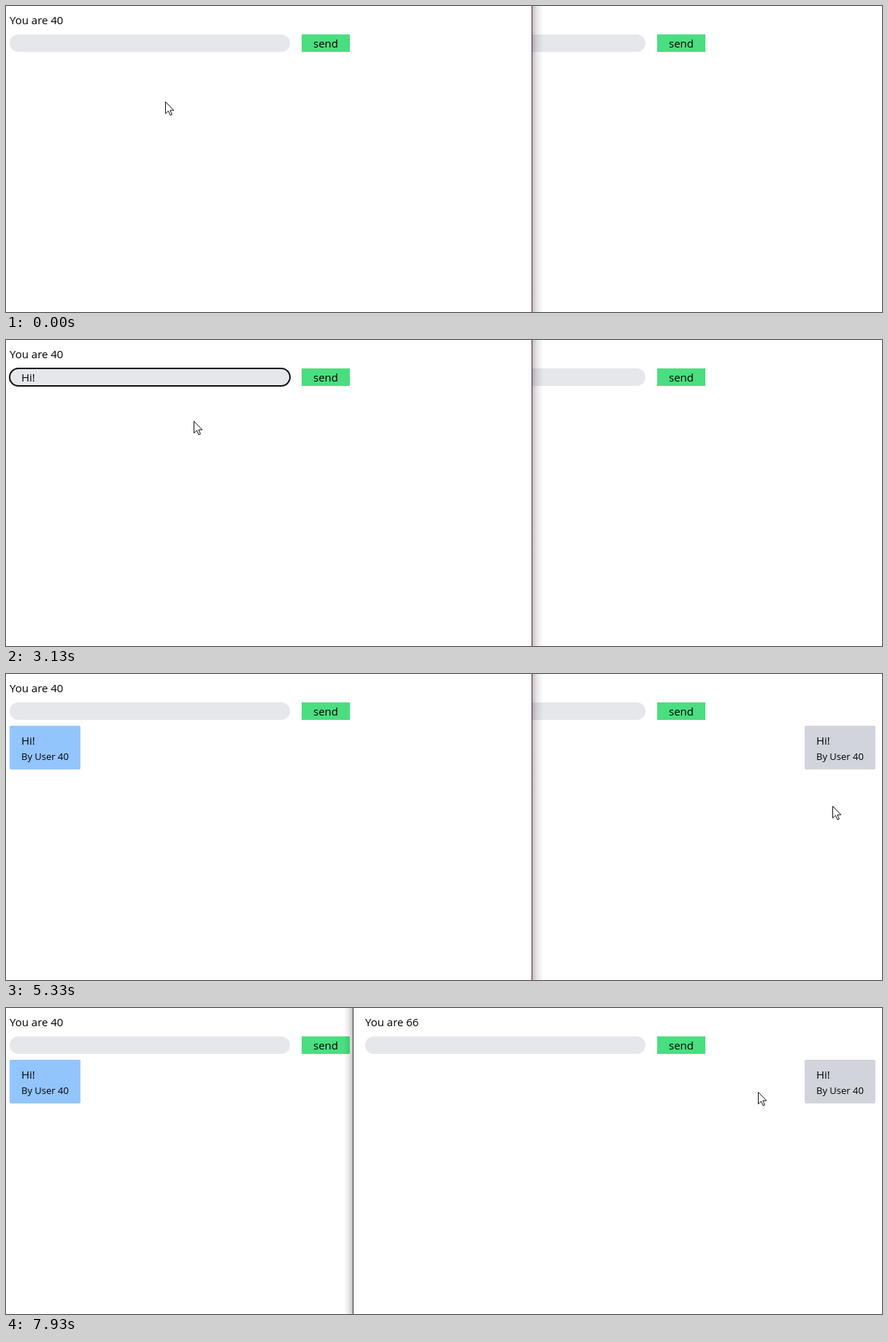
Write an HTML page that moves like this. It is 1200 px wide and 420 px high and loops after 8 s.

```html
<!DOCTYPE html>
<html lang="en">
<head>
<meta charset="utf-8">
<title>Two chat windows</title>
<style>
  html, body { margin: 0; width: 100%; height: 100%; overflow: hidden; background: #fff; }
  svg { display: block; width: 1200px; height: 420px; }
  text { font: 15px "Open Sans", "Noto Sans", sans-serif; fill: #000; }
  .small { font-size: 13px; }
  #cursor path { fill: #fff; stroke: #111; stroke-width: 1; stroke-linejoin: round; }
  #cursor .line { fill: none; }
</style>
</head>
<body>
<svg viewBox="0 0 1200 420">
  <defs>
    <linearGradient id="fade">
      <stop offset="0" stop-opacity=".25"/>
      <stop offset=".4" stop-opacity=".1"/>
      <stop offset="1" stop-opacity="0"/>
    </linearGradient>
  </defs>
  <g id="panes"></g>
  <g id="cursor">
    <g id="arrow"><path d="M.5 .5V16.8L4.4 13.1L7 19L9.4 18L6.9 12.2H11.8Z"/></g>
    <g id="hand">
      <path d="M-1 13V2Q-1 .5 .7 .5T2.5 2V8.5Q2.5 7 4.2 7T6 9Q6 7.8 7.6 7.8T9 10Q9.2 9 10.4 9T11.5 11V16Q11.5 19 9.5 21V23.5H1V21.5L-4.5 14.5Q-5 12.5 -3.5 12T-1 14Z"/>
      <path class="line" d="M2.5 8V13M6 9V13M9 10V13"/>
    </g>
    <g id="beam"><path class="line" d="M-3 -5.5H0M1 -5.5H4M-3 7.5H0M1 7.5H4M.5 -5V7"/></g>
  </g>
</svg>
<script>
const LOOP = 8000, FPS = 15, TICKS = LOOP * FPS / 1000;
const $ = id => document.getElementById(id);

const rect = (x, y, w, h, fill, rx = 0) =>
  `<rect x="${x}" y="${y}" width="${w}" height="${h}" fill="${fill}" rx="${rx}"/>`;
const label = (x, y, str, cls = "") => `<text x="${x}" y="${y}" class="${cls}">${str}</text>`;

const form = (x, user) =>
  label(x, 25, "You are " + user) +
  rect(x, 39, 384, 24, "#e5e7eb", 12) +
  rect(x + 400, 39, 66, 24, "#4ade80") + label(x + 416, 57, "send");

const bubble = (x, fill) =>
  `<g class="message">${rect(x, 71, 97, 60, fill, 2)}` +
  label(x + 16, 97, "Hi!") + label(x + 16, 118, "By User 40", "small") + "</g>";

$("panes").innerHTML = `
  <g id="right">
    <g transform="translate(475 0) scale(-1 1)">${rect(0, 0, 12, 420, "url(#fade)")}</g>
    ${rect(476, 0, 724, 420, "#fff")}${rect(475, 0, 1, 420, "#3c3c3c")}
    ${form(492, 66)}${bubble(1094, "#d1d5db")}
  </g>
  <g id="left">
    ${rect(0, 0, 720, 420, "#fff")}${form(5, 40)}${bubble(5, "#93c5fd")}
    <rect id="ring" x="5" y="39" width="384" height="24" rx="12" fill="none" stroke="#101010" stroke-width="2"/>
    <text id="typed" x="21" y="57"></text>
    <rect id="caret" width="1" height="21"/>
    ${rect(720, 0, 1, 420, "#6b1a47")}${rect(721, 0, 15, 420, "url(#fade)")}
  </g>`;

// Events, in ticks
const FOCUS = 17, CARET = 19, TYPE = 31, PER_KEY = 3.5, BLINK = 8;
const PRESS = 53, SENT = 55, RAISE = 81, CIRCLE = 102, CIRCLE_END = 111;

// Pointer stops: tick, x, y
const stops = [
  [2, 218, 131], [15, 140, 50], [18, 140, 50], [22, 140, 65], [44, 140, 65],
  [48, 310, 119], [51, 466, 72], [SENT, 441, 53], [61, 447, 105], [63, 447, 105],
  [70, 713, 211], [78, 1137, 190], [86, 1079, 145], [89, 995, 133], [99, 302, 47],
  [CIRCLE, 26, 20], [CIRCLE_END, 26, 20], [115, 461, 154], [119, 1030, 115]
];

const slope = (i, axis) =>
  stops[i] && stops[i + 1]
    ? (stops[i + 1][axis] - stops[i][axis]) / (stops[i + 1][0] - stops[i][0]) : 0;

// Speed at a stop: zero at rests and turns, else the harmonic mean of both sides
function speed(i, axis) {
  const a = slope(i - 1, axis), b = slope(i, axis);
  return a * b > 0 ? 2 * a * b / (a + b) : 0;
}

// Smooth curve through the stops
function glide(n, axis) {
  if (n <= stops[0][0]) return stops[0][axis];
  const i = stops.findIndex(s => s[0] >= n) - 1;
  const p = stops[i], q = stops[i + 1], span = q[0] - p[0], k = (n - p[0]) / span;
  const ease = k * k * (3 - 2 * k);
  return p[axis] + (q[axis] - p[axis]) * ease +
    span * k * (1 - k) * ((1 - k) * speed(i, axis) - k * speed(i + 1, axis));
}

function pointAt(n) {
  let x = glide(n, 1), y = glide(n, 2);
  if (n > CIRCLE && n < CIRCLE_END) {
    const turn = 2 * Math.PI * (n - CIRCLE) / (CIRCLE_END - CIRCLE);
    x += 24 * (1 - Math.cos(turn));
    y -= 10 * Math.sin(turn);
  }
  return [Math.round(x), Math.round(y)];
}

function cursorKind(x, y, rightOnTop) {
  const inRight = x >= (rightOnTop ? 475 : 721);
  const dx = x - (inRight ? 492 : 5);
  const inRow = y >= 39 && y < 63;
  if (inRow && dx >= 400 && dx < 466) return "hand";
  if (inRow && dx >= 0 && dx < 384) return "beam";
  if (y >= 8 && y < 32 && dx >= 0 && dx < 75) return "beam";
  return "arrow";
}

const show = (el, on) => { el.style.display = on ? "" : "none"; };

function drawInput(n) {
  const keys = n < TYPE || n >= SENT ? 0 : Math.min(3, 1 + Math.floor((n - TYPE) / PER_KEY));
  const since = keys ? TYPE + (keys - 1) * PER_KEY : CARET;
  const typed = $("typed"), caret = $("caret");
  typed.textContent = "Hi!".slice(0, keys);
  caret.setAttribute("x", Math.round(21 + typed.getComputedTextLength()));
  caret.setAttribute("y", keys ? 40 : 41);
  show(caret, n >= CARET && n < PRESS && Math.floor((n - since) / BLINK) % 2 === 0);
  show($("ring"), n >= FOCUS && n < PRESS);
}

function draw(n) {
  const rightOnTop = n >= RAISE;
  const top = $(rightOnTop ? "right" : "left");
  if ($("panes").lastElementChild !== top) $("panes").append(top);

  drawInput(n);
  document.querySelectorAll(".message").forEach(m => show(m, n >= SENT));

  const [x, y] = pointAt(n);
  const kind = cursorKind(x, y, rightOnTop);
  for (const id of ["arrow", "hand", "beam"]) show($(id), id === kind);
  $("cursor").setAttribute("transform", `translate(${x} ${y})`);
}

const start = performance.now();
let last = -1;
function loop() {
  const t = (performance.now() - start) % LOOP;
  const n = Math.floor((t + 5) * FPS / 1000) % TICKS;
  if (n !== last) draw(last = n);
  requestAnimationFrame(loop);
}
loop();
</script>
</body>
</html>
```
